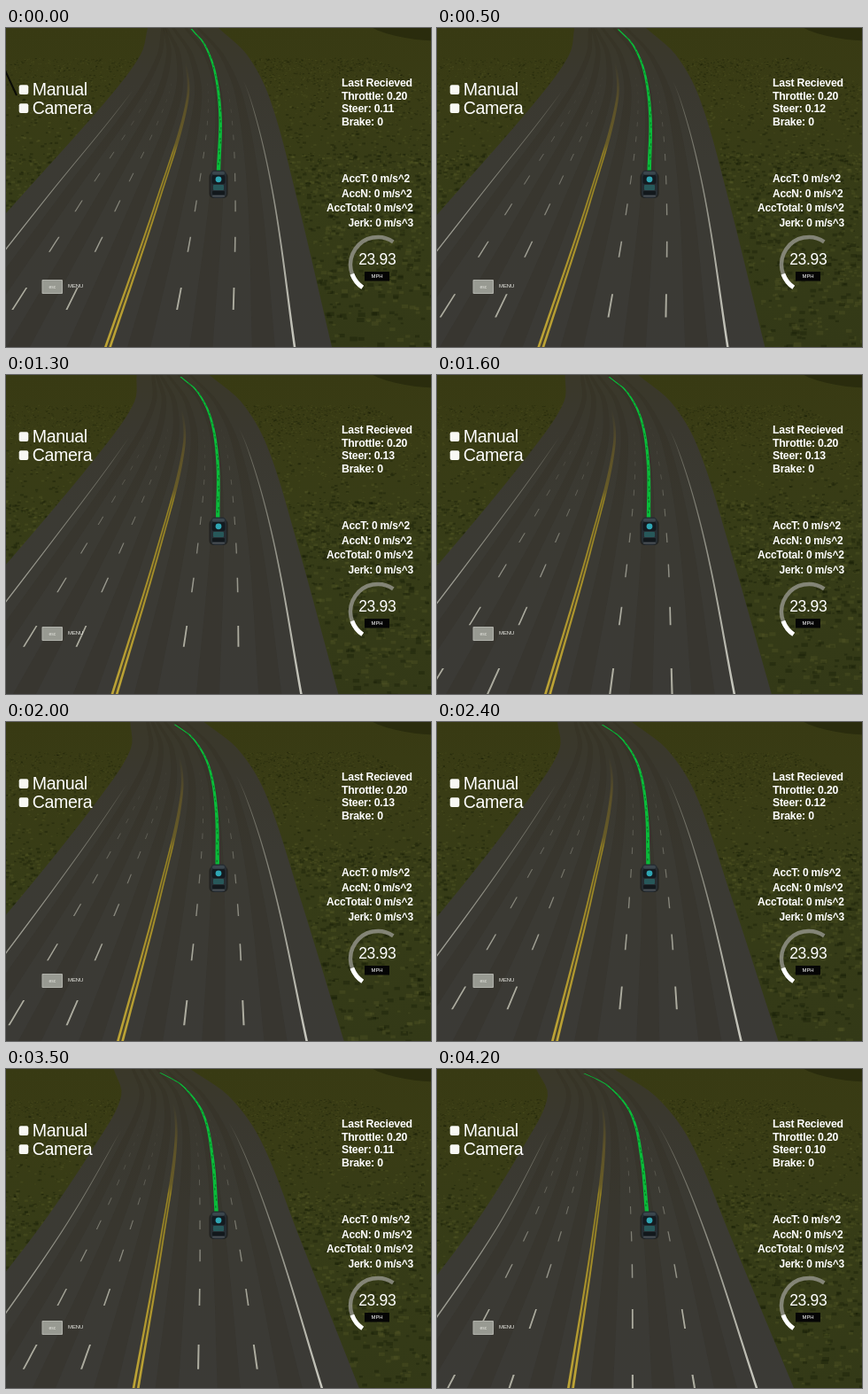
These frames come from a looping animation (480 by 360 pixels, 4300 ms). An HTML page with a canvas:

```html
<!DOCTYPE html>
<html lang="en">
<head>
<meta charset="utf-8">
<title>Driving simulator</title>
<style>
  html, body { margin: 0; height: 100%; overflow: hidden; background: #25280f; }
  canvas { display: block; }
</style>
</head>
<body>
<canvas id="stage" width="480" height="360"></canvas>
<script>
const ctx = document.getElementById('stage').getContext('2d');
const STEPS = 43, STEP_MS = 100, HORIZON = -54;
const SANS = '"Liberation Sans", Arial, sans-serif';

// Motion tracks, sampled at these steps
const times = [0, 9, 16, 24, 30, 35, 42];
const nearTurn = [0, .12, .28, .5, .74, .88, 1];
const farTurn = [0, .18, .32, .5, .66, .8, 1];
const travel = [0, 1.99, 3.5, 5.08, 6.33, 7.25, 8.66];
const steering = [.11, .12, .13, .12, .11, .11, .10];

// x positions at each knot height: start pose, end pose
const knots = [0, 30, 80, 190, 360];
const lines = {
  leftEdge: [[160, 152, 115, 17, -135], [112, 125, 102, 32, -102]],
  left: [[176, 168, 136, 47, -87], [130, 142, 121, 61, -57]],
  center: [[182, 200, 205, 173, 115], [162, 183, 189, 177, 151]],
  right: [[224, 252, 276, 302, 326], [187, 224, 259, 305, 361]],
  rightEdge: [[240, 272, 298, 328, 368], [200, 246, 285, 332, 403]]
};
const pathKnots = [3, 18, 50, 100, 161];
const pathLine = [[211, 224, 236, 242, 240], [162, 192, 219, 231, 237]];

const mix = (a, b, t) => a + (b - a) * t;
const clamp = (v, lo, hi) => Math.min(hi, Math.max(lo, v));
const wrap = (v, n) => ((v % n) + n) % n;
const scaleAt = y => (y - HORIZON) / (360 - HORIZON);
const depthToY = d => HORIZON + 1754 / d;

function sample(track, step) {
  let i = 0;
  while (i < times.length - 2 && step > times[i + 1]) i++;
  return mix(track[i], track[i + 1], (step - times[i]) / (times[i + 1] - times[i]));
}

function random(seed) {
  return () => (seed = (seed * 16807) % 2147483647) / 2147483647;
}

// Smooth x(y) through the knots
function curve(ys, xs) {
  const slope = (i, j) => (xs[j] - xs[i]) / (ys[j] - ys[i]);
  const last = xs.length - 1;
  const tangents = xs.map((_, i) => slope(Math.max(i - 1, 0), Math.min(i + 1, last)));
  return y => {
    let i = 0;
    while (i < last - 1 && y > ys[i + 1]) i++;
    const h = ys[i + 1] - ys[i], t = (y - ys[i]) / h, s = 1 - t;
    return s * s * ((1 + 2 * t) * xs[i] + t * h * tangents[i])
      + t * t * ((3 - 2 * t) * xs[i + 1] - s * h * tangents[i + 1]);
  };
}

// Half of the tufts stay close to the camera
const rnd = random(71);
const tufts = Array.from({ length: 7000 }, () => {
  const span = rnd() < .5 ? 5 : 16;
  return {
    span, depth: rnd() * span, side: rnd() < .4 ? -1 : 1, offset: rnd() * 1.6,
    size: .5 + rnd(), color: rnd() < .5 ? 'rgba(92,98,44,.26)' : 'rgba(14,20,0,.3)'
  };
});

function gradient(...stops) {
  const g = ctx.createLinearGradient(0, 0, 0, 360);
  stops.forEach(([y, color]) => g.addColorStop(y / 360, color));
  return g;
}
const grassFill = gradient([0, '#383a13'], [80, '#393c15'], [200, '#363c17'], [360, '#333917']);
const roadFill = gradient([0, '#3a3829'], [60, '#3a382f'], [150, '#3b3a33'], [360, '#3b3a36']);
const whiteFill = gradient([60, 'rgba(180,180,165,0)'], [95, 'rgba(180,180,165,.4)'],
  [170, 'rgba(185,185,172,.6)'], [260, 'rgba(200,200,188,.8)'], [360, 'rgba(215,215,205,.9)']);
const leftFill = gradient([70, 'rgba(175,175,160,0)'], [100, 'rgba(175,175,160,.4)'],
  [230, 'rgba(190,190,178,.75)']);
const yellowFill = gradient([130, 'rgba(150,130,34,0)'], [141, 'rgba(158,138,34,.85)'],
  [250, '#ac942c'], [360, '#bea536']);
const yellowBase = gradient([40, 'rgba(112,96,36,0)'], [85, 'rgba(112,96,36,.6)'],
  [139, 'rgba(122,106,36,.75)'], [160, 'rgba(110,96,36,.5)'], [360, 'rgba(100,86,36,.4)']);

function band(leftX, rightX, y0, y1, fill) {
  const steps = Math.max(2, Math.ceil((y1 - y0) / 6));
  ctx.beginPath();
  for (let i = 0; i <= steps; i++) {
    const y = mix(y0, y1, i / steps);
    ctx.lineTo(leftX(y), y);
  }
  for (let i = steps; i >= 0; i--) {
    const y = mix(y0, y1, i / steps);
    ctx.lineTo(rightX(y), y);
  }
  ctx.fillStyle = fill;
  ctx.fill();
}

function stripe(x, width, y0, y1, fill, shift = 0) {
  const side = k => y => x(y) + (shift + k * width / 2) * scaleAt(y);
  band(side(-1), side(1), y0, y1, fill);
}

function box(x, y, w, h, fill, radius = 0) {
  ctx.fillStyle = fill;
  ctx.beginPath();
  ctx.roundRect(x, y, w, h, radius);
  ctx.fill();
}

function text(str, x, y, size, weight = 'normal', align = 'left', color = '#fff') {
  ctx.font = `${weight} ${size}px ${SANS}`;
  ctx.letterSpacing = `${-size * .018}px`;
  ctx.textAlign = align;
  ctx.fillStyle = color;
  ctx.fillText(str, x, y);
}

function drawGrass(road, moved) {
  ctx.fillStyle = grassFill;
  ctx.fillRect(0, 0, 480, 360);
  for (const tuft of tufts) {
    const y = depthToY(4 + wrap(tuft.depth - moved, tuft.span)), s = scaleAt(y);
    const edge = tuft.side < 0 ? road.leftEdge(y) : road.rightEdge(y);
    ctx.fillStyle = tuft.color;
    ctx.fillRect(edge + tuft.side * tuft.offset * 414 * s, y, 6 * tuft.size * s, 3.5 * tuft.size * s);
  }
  ctx.fillStyle = 'rgba(20,24,6,.4)';
  ctx.beginPath();
  ctx.ellipse(465, -4, 62, 17, .12, 0, 7);
  ctx.fill();
}

function drawRoad(road, moved) {
  const lanes = [[road.left, road.center], [road.center, road.right]];
  const across = ([a, b], k) => y => mix(a(y), b(y), k);

  band(road.leftEdge, road.rightEdge, 0, 360, roadFill);
  for (const side of lanes)
    for (const k of [1 / 6, 1 / 2, 5 / 6]) stripe(across(side, k), 26, 0, 360, 'rgba(38,34,24,.16)');
  stripe(road.left, 2.3, 60, 360, leftFill);
  stripe(road.right, 2.6, 60, 360, whiteFill);
  stripe(road.center, 9, 40, 360, yellowBase);
  for (const shift of [-2.6, 2.6]) stripe(road.center, 2.7, 130, 360, yellowFill, shift);

  const phase = wrap(5.056 - moved, 1);
  for (let n = 4; n < 16; n++) {
    const top = depthToY(n + phase);
    const bottom = Math.min(362, depthToY(n + phase - .34));
    if (top > 360) continue;
    const alpha = clamp((top - 60) / 260, .06, .78);
    for (const side of lanes)
      for (const k of [1 / 3, 2 / 3])
        stripe(across(side, k), 2.2, top, bottom, `rgba(205,205,190,${alpha})`);
  }
}

function drawPath(x, top, moved) {
  const side = k => y => x(y) + k * mix(.9, 2.2, y / 160);
  band(side(-1), side(1), top, 161, '#0abc3a');
  for (let i = 0; i < 26; i++) {
    const y = 8 + i * 6 + (moved * 13 + i * 2) % 4;
    if (y < 158) band(side(-.5 + (i % 3) * .3), side(.1 + (i % 3) * .3), y, y + 2.5, 'rgba(0,85,22,.6)');
  }
}

function drawCar() {
  box(229.5, 163, 21, 29, 'rgba(8,10,12,.5)', 5);
  box(231, 160.5, 18, 31.5, '#262d32', 5);
  box(233, 162, 14, 3.5, '#3b474e', 2);
  box(232.5, 166, 15, 10, '#141b20', 2);
  box(234, 177, 12, 6, '#27585a', 1);
  box(233, 184, 14, 4, '#12181c', 1);
  box(233, 189, 14, 1.5, '#4a5156', 1);
  ctx.fillStyle = '#2fa6b4';
  ctx.beginPath();
  ctx.arc(240, 170.8, 3.4, 0, 7);
  ctx.fill();
}

function arc(from, to, width, color) {
  ctx.beginPath();
  ctx.arc(420, 267, 31, from * Math.PI / 180, to * Math.PI / 180);
  ctx.lineWidth = width;
  ctx.strokeStyle = color;
  ctx.stroke();
}

function drawHud(step) {
  box(14.7, 64.3, 10.6, 10.6, '#f8f8f4', 2);
  box(14.7, 85.3, 10.6, 10.6, '#f8f8f4', 2);
  text('Manual', 29.7, 76.4, 19.6);
  text('Camera', 29.7, 97.4, 19.6);

  const steer = sample(steering, step).toFixed(2);
  ['Last Recieved', 'Throttle: 0.20', `Steer: ${steer}`, 'Brake: 0']
    .forEach((str, i) => text(str, 379, 66.2 + i * 14.6, 12.3, 'bold'));
  [['AccT: 0 m/s^2', 379], ['AccN: 0 m/s^2', 379], ['AccTotal: 0 m/s^2', 362], ['Jerk: 0 m/s^3', 386.5]]
    .forEach(([str, x], i) => text(str, x, 174.4 + i * 16.4, 12, 'bold'));

  arc(124, 304, 4.5, 'rgba(150,150,142,.8)');
  arc(124, 160, 5, '#fff');
  text('23.93', 419.3, 267.3, 17.5, 'normal', 'center');
  box(405, 275, 28, 10.5, '#050505');
  text('MPH', 419, 282.4, 6, 'normal', 'center');

  box(40.5, 284, 23.5, 16, '#b0b1aa', 1);
  box(41.5, 285, 21.5, 14, '#989a92', 1);
  text('esc', 52.3, 293.6, 5, 'normal', 'center', '#e8e8e2');
  text('MENU', 70, 293.3, 6, 'normal', 'left', '#eeeee8');
}

function draw(step) {
  const near = sample(nearTurn, step), far = sample(farTurn, step), moved = sample(travel, step);
  const road = {};
  for (const name in lines) {
    const [start, end] = lines[name];
    road[name] = curve(knots, start.map((x, i) => mix(x, end[i], mix(far, near, knots[i] / 360))));
  }
  drawGrass(road, moved);
  if (step < 4) {
    ctx.strokeStyle = '#0a0b06';
    ctx.lineWidth = 2;
    ctx.beginPath();
    ctx.moveTo(-1 - step * 4, 48 + step * 3);
    ctx.lineTo(12 - step * 4, 76 + step * 3);
    ctx.stroke();
  }
  drawRoad(road, moved);
  const path = curve(pathKnots, pathLine[0].map((x, i) => mix(x, pathLine[1][i], far)));
  drawPath(path, mix(1, 5, far), moved);
  drawCar();
  drawHud(step);
}

let shown = -1;
const startTime = performance.now();
function tick() {
  const step = Math.floor((performance.now() - startTime) / STEP_MS) % STEPS;
  if (step !== shown) draw(shown = step);
  requestAnimationFrame(tick);
}
tick();
</script>
</body>
</html>
```
